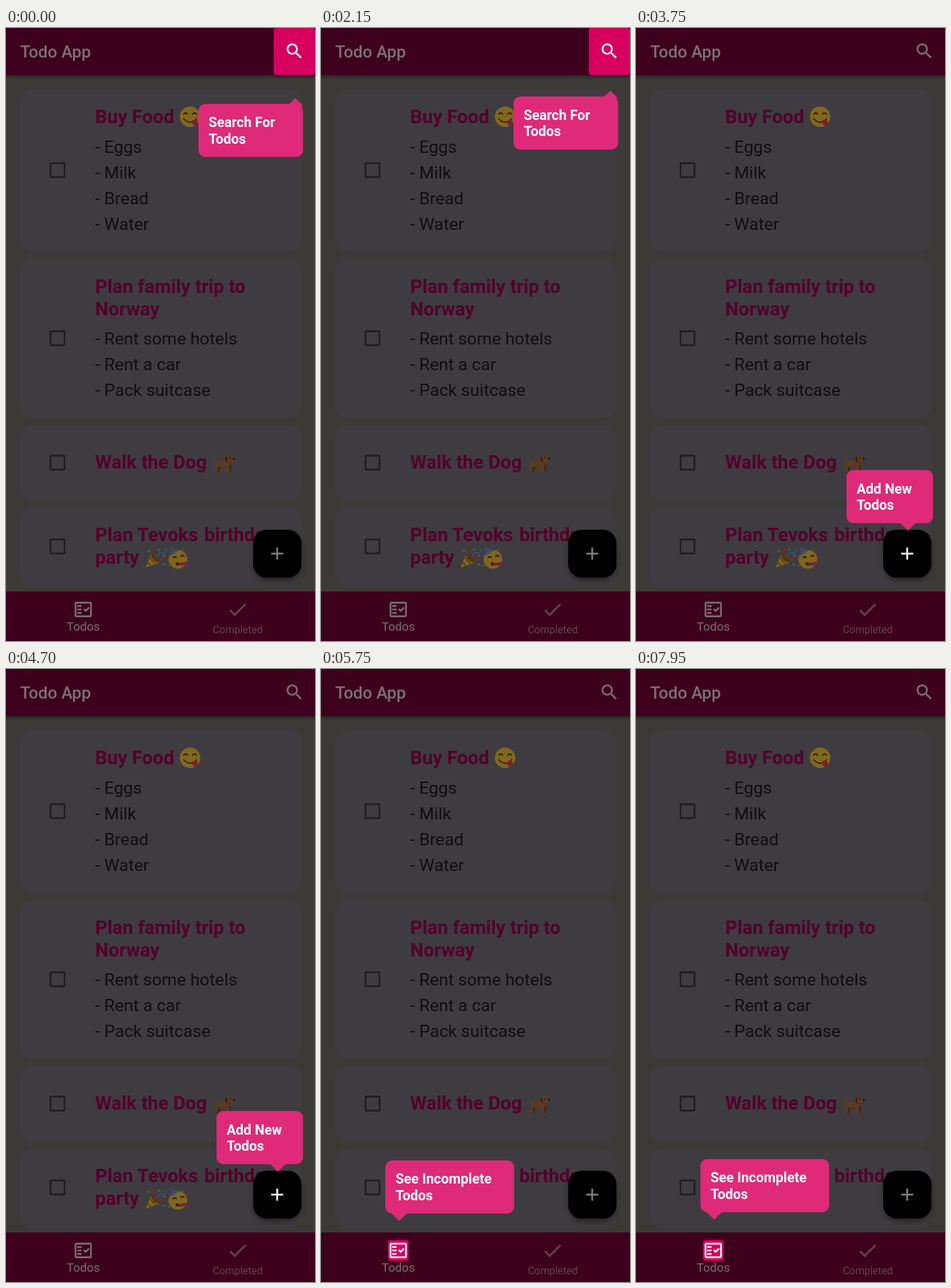
An HTML page for the animation above (8000 ms loop, 480x953 px).

```html
<!DOCTYPE html>
<html lang="en">
<head>
<meta charset="utf-8">
<title>Todo tour</title>
<style>
  html, body { margin: 0; width: 100%; height: 100%; overflow: hidden; background: #3b3a36; }
  svg { display: block; width: 100%; height: 100%; font-family: Roboto, sans-serif; }
  .card { fill: #3e3c40; }
  .head { font-size: 29.33px; font-weight: 700; fill: #54002a; }
  .body { font-size: 26.67px; fill: #0f0e10; }
  .box { fill: none; stroke: #1f1d20; stroke-width: 2.67; }
  .tip { font-size: 21.33px; font-weight: 700; fill: #fff; }
  .bar { fill: #3d001d; }
  .dim { fill: #797075; }
  .off { fill: #64424f; }
  .pink { fill: #d6005f; }
</style>
</head>
<body>
<svg viewBox="0 0 480 953" preserveAspectRatio="none">
  <defs>
    <linearGradient id="fall" x2="0" y2="1">
      <stop offset="0" stop-color="#000" stop-opacity=".38"/>
      <stop offset="1" stop-color="#000" stop-opacity="0"/>
    </linearGradient>
    <filter id="blur" x="-30%" y="-30%" width="160%" height="160%"><feGaussianBlur stdDeviation="4"/></filter>
    <path id="lens" d="M15.5 14h-.79l-.28-.27C15.41 12.59 16 11.11 16 9.5 16 5.91 13.09 3 9.5 3S3 5.91 3 9.5 5.91 16 9.5 16c1.61 0 3.09-.59 4.23-1.57l.27.28v.79l5 4.99L20.49 19zm-6 0C7.01 14 5 11.99 5 9.5S7.01 5 9.5 5 14 7.01 14 9.5 11.99 14 9.5 14z"/>
    <path id="plus" d="M19 13h-6v6h-2v-6H5v-2h6V5h2v6h6z"/>
    <path id="list" fill-rule="evenodd" d="M20 3H4c-1.1 0-2 .9-2 2v14c0 1.1.9 2 2 2h16c1.1 0 2-.9 2-2V5c0-1.1-.9-2-2-2zm0 16H4V5h16zM19.41 10.42 17.99 9l-3.17 3.17-1.41-1.42L12 12.16 14.82 15zM5 7h5v2H5zM5 11h5v2H5zM5 15h5v2H5z"/>
    <path id="done" d="M9 16.17 4.83 12l-1.42 1.41L9 19 21 7l-1.41-1.41z"/>
  </defs>

  <rect width="480" height="953" fill="#3b3a36"/>
  <g id="cards"></g>

  <!-- smiling face -->
  <g transform="translate(286 138)" fill="none" stroke="#2b1a08" stroke-width="1.8" stroke-linecap="round">
    <circle r="16" fill="#80681c" stroke="none"/>
    <path d="M-10-4q3-4 6 0M4-4q3-4 6 0M-10 3Q0 14 10 3"/>
    <path d="M2 7q6-5 9-1 3 5-1 8-6 1-8-7z" fill="#7c2034" stroke="none"/>
  </g>

  <!-- dog -->
  <g transform="translate(320 659)" fill="#5c3a20">
    <path d="M2 3q-2 5 1 9l3 5v6l-2 8h4l4-8 9-1 1 9h4l1-10 3-7 5 1 1-4-5-3q-2-5-7-3l-3 8-12 1-4-2q-3-4-3-9z"/>
    <path d="M24 7q-4 1-3 7l3 1z" fill="#38210f"/>
    <path d="M9 23l-1 9h3l3-9zM26 22l2 9h3l-2-12z" fill="#442a15"/>
    <path d="M21 15l7 2" stroke="#74202a" stroke-width="2"/>
    <circle cx="28" cy="9" r="1"  fill="#120a05"/>
    <circle cx="34" cy="11" r="1.4" fill="#120a05"/>
  </g>

  <!-- popper -->
  <g transform="translate(216 807)">
    <path d="M1 32 9 11q10 4 14 13z" fill="#80651e"/>
    <path d="M4 24l5 5M7 16l9 10" stroke="#5c3c10" stroke-width="2"/>
    <ellipse cx="16" cy="17" rx="9" ry="4" transform="rotate(44 16 17)" fill="#4c3810"/>
    <g fill="none" stroke-width="2.2" stroke-linecap="round">
      <path d="M14 13q4-5 0-10" stroke="#7a2338"/>
      <path d="M18 16q3-8 9-7t5-6" stroke="#2a5474"/>
      <path d="M21 20q5-5 10-1" stroke="#7a2338"/>
    </g>
    <g fill="#467030"><circle cx="6" cy="6" r="1.7"/><circle cx="22" cy="4" r="1.7"/><circle cx="29" cy="27" r="1.7"/></g>
    <circle cx="30" cy="13" r="1.6" fill="#80651e"/>
  </g>

  <!-- party face -->
  <g transform="translate(267 825)">
    <circle cy="1" r="14.5" fill="#80661c"/>
    <path d="M-14-3-11-18 1-12z" fill="#2c5672"/>
    <path d="M-13-8l6-7" stroke="#7a2338" stroke-width="2.5"/>
    <path d="M-8-1q3-4 6 0M4-3q3-4 6 0" fill="none" stroke="#2b1a08" stroke-width="1.8"/>
    <path d="M0 7 13 5l3 5-15 1z" fill="#7a2338"/>
    <circle cx="-1" cy="8" r="2.6" fill="#40200c"/>
    <g fill="#386040"><circle cx="8" cy="-14" r="1.7"/><circle cx="-14" cy="11" r="1.7"/></g>
    <circle cx="14" cy="-9" r="1.7" fill="#7a2338"/>
  </g>

  <rect class="bar" width="480" height="73"/>
  <rect y="73" width="480" height="7" fill="url(#fall)"/>
  <text class="dim" x="22" y="46" font-size="26" font-weight="500">Todo App</text>
  <use class="dim" href="#lens" transform="translate(432 20) scale(1.333)"/>

  <rect class="bar" y="876" width="480" height="77"/>
  <use class="dim" href="#list" transform="translate(104 888) scale(1.333)"/>
  <text class="dim" x="120" y="937" font-size="18.67" text-anchor="middle">Todos</text>
  <use class="off" href="#done" transform="translate(341.7 886) scale(1.5)"/>
  <text class="off" x="360" y="940.5" font-size="16" text-anchor="middle">Completed</text>

  <rect x="385" y="785" width="73" height="74" rx="21" opacity=".4" filter="url(#blur)"/>
  <rect x="384" y="780" width="75" height="74.5" rx="21"/>
  <use id="add" href="#plus" transform="translate(405.3 801.2) scale(1.333)"/>

  <g id="spot0">
    <rect class="pink" x="416" width="64" height="73" rx="4"/>
    <use href="#lens" fill="#fff" transform="translate(432 20) scale(1.333)"/>
  </g>
  <g id="spot2">
    <rect class="pink" x="104" y="888" width="32" height="32" rx="4"/>
    <use href="#list" fill="#fff" transform="translate(104 888) scale(1.333)"/>
  </g>
  <g id="tips"></g>
</svg>

<script>
const LOOP = 8000, SLIDE = 2000;
const $ = id => document.getElementById(id);
const text = (cls, x, y, s) => `<text class="${cls}" x="${x}" y="${y}">${s}</text>`;

// [top, bottom, checkbox centre, heading baseline, heading lines, item baseline, items]
const cards = [
  [95, 347.5, 221, 148, ['Buy Food'], 193.5, ['Eggs', 'Milk', 'Bread', 'Water']],
  [359, 606, 482.3, 412, ['Plan family trip to', 'Norway'], 492, ['Rent some hotels', 'Rent a car', 'Pack suitcase']],
  [617, 734.5, 675.7, 685, ['Walk the Dog'], 0, []],
  [745.5, 868, 806, 798, ['Plan Tevoks', 'party'], 0, []]
];
$('cards').innerHTML = cards.map(([top, bottom, mid, headY, heads, itemY, items]) =>
  `<rect class="card" x="22" y="${top}" width="437" height="${bottom - top}" rx="20"/>` +
  `<rect class="box" x="69.1" y="${mid - 10.9}" width="21.8" height="21.8" rx="1"/>` +
  heads.map((s, i) => text('head', 138.5, headY + i * 35.2, s)).join('') +
  items.map((s, i) => text('body', 138.5, itemY + i * 40, '- ' + s)).join('')
).join('') + text('head', 308, 798, 'birthday');

// Each tip slides between low and low + range; its slide begins at `from`.
const tips = [
  { show: 0, from: -1900, low: 106.5, range: 11.5, x: 299, w: 162.5, arrow: 449.5, up: true, lines: ['Search For', 'Todos'] },
  { show: 2220, from: 2220, low: 666, range: 24, x: 327, w: 134.5, arrow: 422.5, lines: ['Add New', 'Todos'] },
  { show: 4800, from: 4800, low: 753, range: 24, x: 100, w: 200, arrow: 121.5, lines: ['See Incomplete', 'Todos'] }
];
$('tips').innerHTML = tips.map(({ x, w, arrow, up, lines }, i) => {
  const [base, tip] = up ? [3, -9] : [82, 94.3];
  return `<g id="tip${i}"><g fill="#de2a78"><rect x="${x}" width="${w}" height="82.5" rx="10.5"/>` +
    `<path d="M${arrow - 12.3} ${base}H${arrow + 12.3}L${arrow} ${tip}z"/></g>` +
    lines.map((s, j) => text('tip', x + 15.7, 36.4 + j * 25.4, s)).join('') + '</g>';
}).join('');

// cubic-bezier(.42, 0, .58, 1)
function ease(p) {
  let a = 0, b = 1;
  for (let i = 0; i < 24; i++) {
    const s = (a + b) / 2, r = 1 - s;
    if (3 * r * r * s * .42 + 3 * r * s * s * .58 + s * s * s < p) a = s; else b = s;
  }
  return a * a * (3 - 2 * a);
}

function draw(t) {
  const now = t < tips[1].show ? 0 : t < tips[2].show ? 1 : 2;
  tips.forEach(({ from, low, range }, i) => {
    const g = $('tip' + i);
    g.style.display = i === now ? '' : 'none';
    if (i !== now) return;
    const p = (t - from) / SLIDE % 2;
    g.setAttribute('transform', `translate(0 ${low + range * ease(p > 1 ? 2 - p : p)})`);
  });
  $('spot0').style.display = now === 0 ? '' : 'none';
  $('spot2').style.display = now === 2 ? '' : 'none';
  $('add').setAttribute('fill', now === 1 ? '#fff' : '#808080');
}

const start = performance.now();
function tick() {
  draw((performance.now() - start) % LOOP);
  requestAnimationFrame(tick);
}
tick();
</script>
</body>
</html>
```
